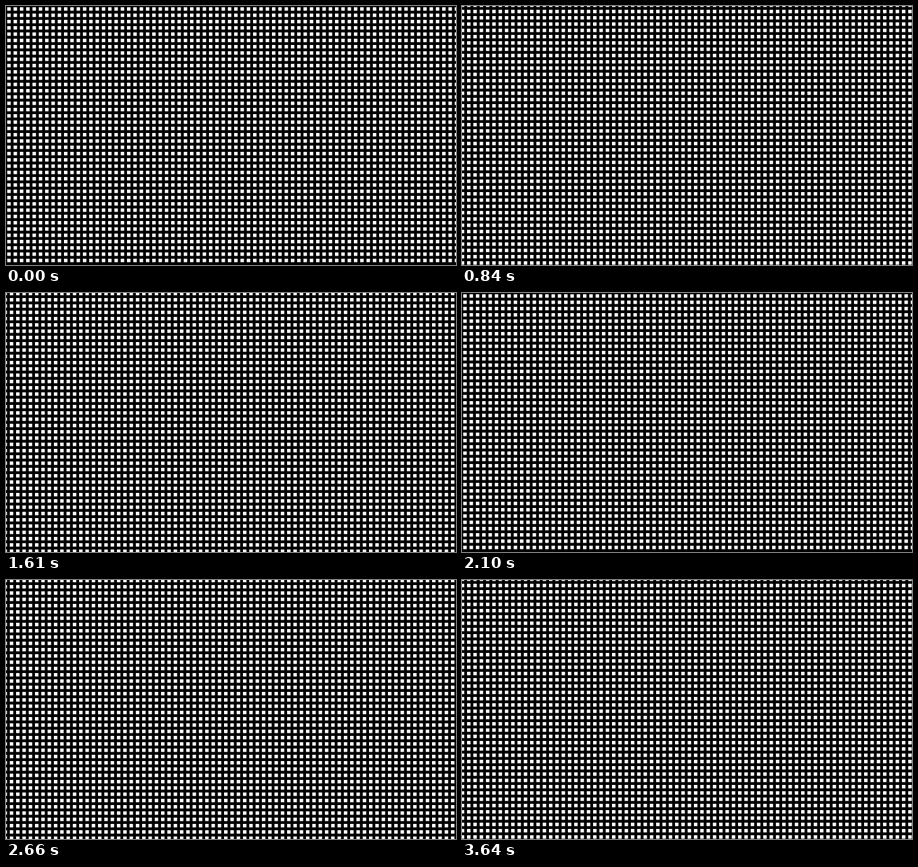
Write an HTML page that moves like this. It is 714 px wide and 412 px high and loops after 3710 ms.

```html
<!DOCTYPE html>
<html lang="en">
<head>
<meta charset="utf-8">
<title>Drifting squares</title>
<style>
  html, body {
    margin: 0;
    width: 100%;
    height: 100%;
    overflow: hidden;
    background: #000;
  }

  /* Black bands in both directions leave soft-edged 5.5px squares on a 10px grid. */
  .grid {
    width: 714px;
    height: 412px;
    background-color: #fff;
    background-image:
      linear-gradient(transparent 5px, #000 6px),
      linear-gradient(90deg, transparent 5px, #000 6px);
    background-size: 10px 10px;
    background-position: 2px 2px;
    animation: drift 3710ms steps(53, end) infinite;
  }

  /* 2px down and to the left every 70ms */
  @keyframes drift {
    from { background-position: 2px 2px; }
    to { background-position: -104px 108px; }
  }
</style>
</head>
<body>
<div class="grid"></div>
</body>
</html>
```
